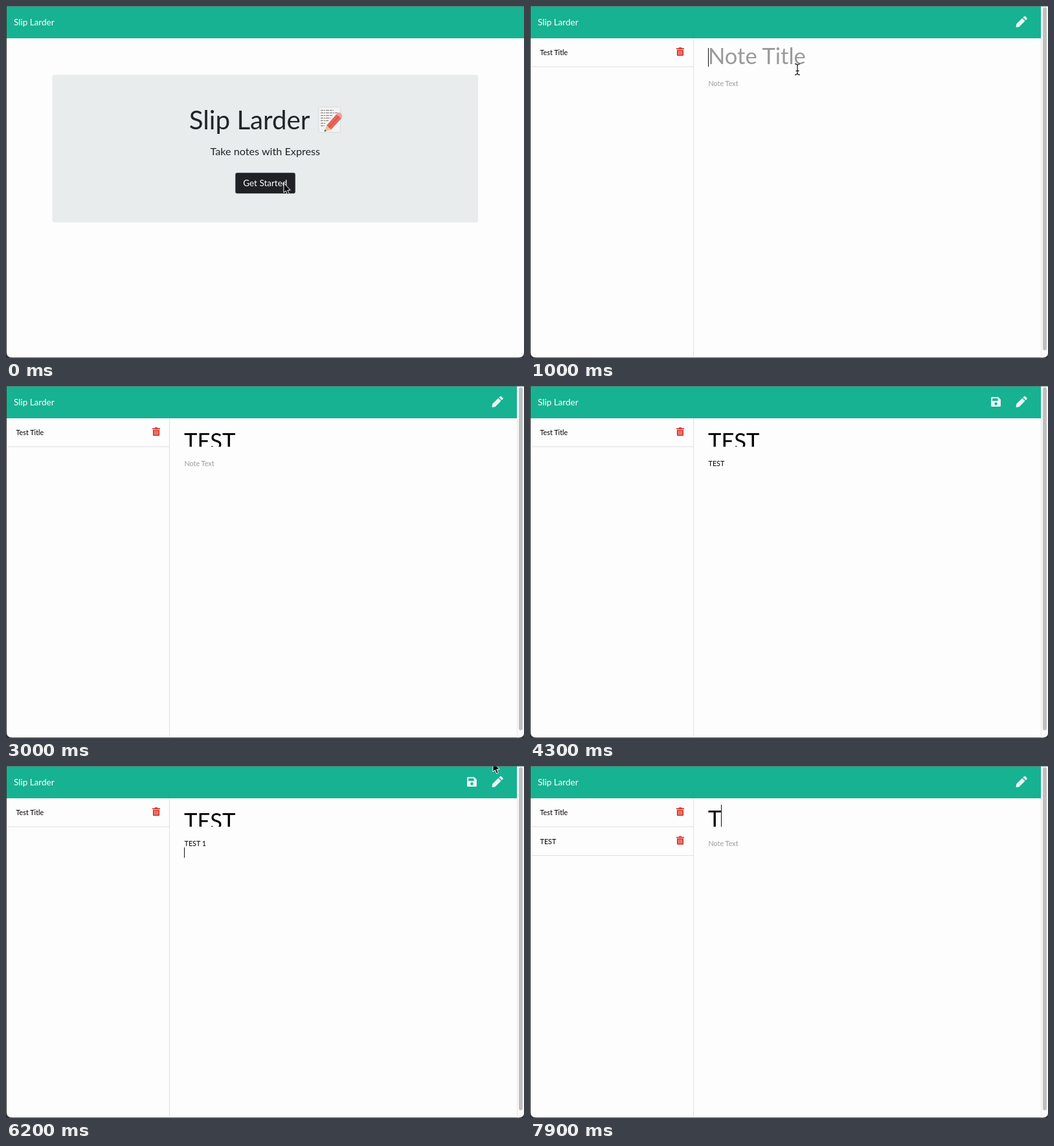
Animation, 800 px wide and 545 px high, one loop 8 s. Source, as an HTML page:

```html
<!DOCTYPE html>
<html lang="en">
<head>
<meta charset="utf-8">
<title>Slip Larder</title>
<style>
  html, body { margin: 0; width: 100%; height: 100%; overflow: hidden; background: #333; }
  svg { display: block; width: 800px; height: 545px; }
  text { font: 10.8px Lato, sans-serif; white-space: pre; }
  .brand { font-size: 13.5px; fill: #fff; }
  .big { font-size: 34.56px; }
  .rule { stroke: #dedfe0; }
</style>
</head>
<body>
<svg viewBox="0 0 800 545">
  <defs>
    <clipPath id="window"><path d="M1 .7H800V536Q800 544.3 792 544.3H9Q1 544.3 1 536Z"/></clipPath>
    <clipPath id="titleBox"><rect x="274" y="56" width="500" height="38"/></clipPath>
    <g id="trash">
      <path fill="#db3a2e" d="M0 1.3H3.6L4.4 0H7.6L8.4 1.3H12V3H0ZM.9 3.8H11.1V12Q11.1 13.3 9.8 13.3H2.2Q.9 13.3 .9 12Z"/>
      <path stroke="#f6d2ce" stroke-width=".9" d="M3.7 5.4V11.6M6 5.4V11.6M8.3 5.4V11.6"/>
    </g>
    <path id="beamShape" d="M-4 -8.5Q0 -8.5 0 -5.5V5.5Q0 8.5 -4 8.5M4 -8.5Q0 -8.5 0 -5.5M0 5.5Q0 8.5 4 8.5M-2.5 2.5H2.5"/>
  </defs>

  <g clip-path="url(#window)">
    <rect width="800" height="545" fill="#fefdfe"/>
    <rect width="800" height="50" fill="#17b292"/>
    <text class="brand" x="12" y="29.5">Slip Larder</text>

    <g id="landing">
      <rect x="71.5" y="106.5" width="657.5" height="228.5" rx="3.5" fill="#e8ecec"/>
      <text x="469.5" y="190.5" text-anchor="end" style="font-size:40.3px" fill="#212529">Slip Larder</text>
      <g id="memoIcon">
        <rect x="483" y="156.5" width="33.5" height="39" rx="1" fill="#f3f3f2" stroke="#d9dbdb"/>
        <path fill="none" stroke="#777" stroke-width="1" stroke-dasharray="4 1 2 1 5 1"
              d="M486 161.5H506M486 165.5H512M486 169.5H505M486 173.5H501M486 177.5H498M486 181.5H494M486 185.5H492"/>
        <path fill="#e9655a" d="M495 185L510.5 167.500L518 174L502 191.500Z"/>
        <path fill="#f2a29a" d="M510.500 167.500L513 165Q516 164 518.500 167.500Q520 170.500 518 174Z"/>
        <path fill="#e9c39a" d="M495 185L502 191.500L491.500 194.500Z"/>
        <path fill="#444" d="M492.600 191.200L494.700 193.600L491.500 194.500Z"/>
        <path stroke="#c9473f" d="M498.500 188.200L514.500 170.500"/>
      </g>
      <text x="400.300" y="231.300" text-anchor="middle" style="font-size:16.2px" fill="#212529">Take notes with Express</text>
      <rect x="354" y="258" width="93" height="32.500" rx="3" fill="#1f2124" stroke="#c9dcf0" stroke-width=".6"/>
      <text class="brand" x="400.300" y="278.800" text-anchor="middle">Get Started</text>
    </g>

    <g id="notes">
      <path class="rule" d="M252.500 50V545"/>
      <g id="firstNote">
        <text x="15.500" y="76">Test Title</text>
        <use href="#trash" x="226" y="64"/>
        <path class="rule" d="M2 94H252"/>
      </g>
      <g id="secondNote">
        <text x="15.500" y="120.500">TEST</text>
        <use href="#trash" x="226" y="108.500"/>
        <path class="rule" d="M2 138.500H252"/>
      </g>
      <g clip-path="url(#titleBox)"><text id="title" class="big" x="275"></text></g>
      <text id="body" x="275.500" y="124"></text>
      <rect id="caret" width="1" fill="#111"/>
      <g fill="#e9f7f4">
        <path transform="translate(750.500 15.700) scale(.0336)"
              d="M284 100L22 362 0 490Q0 512 22 512L150 490 412 228Q420 219 412 211L301 100Q292 92 284 100ZM452 188L324 60 370 14Q404 -14 438 14L498 74Q526 108 498 142Z"/>
        <path id="save" fill-rule="evenodd" transform="translate(712 17)"
              d="M1.600 0H11L15 4V13.400Q15 15 13.400 15H1.600Q0 15 0 13.400V1.600Q0 0 1.600 0ZM2.200 2.200V6H10.600V2.200ZM7.500 8.300A2.200 2.200 0 1 0 7.500 12.700A2.200 2.200 0 1 0 7.500 8.300Z"/>
      </g>
      <rect x="789.500" width="11" height="545" fill="#fafafa"/>
      <path stroke="#e9e9ea" d="M789.500 0V545"/>
      <rect x="792" y="2" width="6" height="531" rx="3" fill="#c0c0c1"/>
    </g>

    <path id="arrow" fill="#000" stroke="#fff" stroke-width="1" stroke-linejoin="round"
          d="M0 0V15L3.300 12L5.800 17.800L8.200 16.700L5.800 11.100H10.200Z"/>
    <g id="beam" fill="none">
      <use href="#beamShape" stroke="#fff" stroke-width="2.600"/>
      <use href="#beamShape" stroke="#222" stroke-width="1.300"/>
    </g>
  </g>
</svg>

<script>
const LOOP = 8000, STEP = 100, BLINK = 520, LEFT = 275;
const el = id => document.getElementById(id);
const show = (id, on) => el(id).style.display = on ? '' : 'none';

// Editor states: time, title, body, focused field
const edits = [
  [0, '', '', ''], [780, '', '', 'title'],
  [1600, 'T', '', 'title'], [1700, 'TE', '', 'title'],
  [1900, 'TES', '', 'title'], [2000, 'TEST', '', 'title'],
  [2280, 'TEST', '', 'body'],
  [3200, 'TEST', 'T', 'body'], [3300, 'TEST', 'TE', 'body'],
  [3500, 'TEST', 'TES', 'body'], [3600, 'TEST', 'TEST', 'body'],
  [3780, 'TEST', 'TEST ', 'body'], [4400, 'TEST', 'TEST 1', 'body'],
  [4680, 'TEST', 'TEST 1\n', 'body'],
  [6500, '', '', ''], [7000, '', '', 'title'], [7900, 'T', '', 'title']
];

// Pointer stops: time, x, y
const stops = [
  [0, 429, 274], [100, 429, 274], [800, 413, 98], [5500, 413, 98],
  [5900, 452, 76], [6199, 452, 76], [6200, 752, -6], [6400, 721, 24],
  [6600, 717, 28], [7000, 465, 86], [7200, 465, 86], [7300, 468, 85]
];

const lastBefore = (list, t) => list.findLastIndex(item => item[0] <= t);

function pointerAt(t) {
  const i = lastBefore(stops, t);
  const [t0, x0, y0] = stops[i];
  const [t1, x1, y1] = stops[i + 1] || [LOOP, x0, y0];
  const p = (t - t0) / (t1 - t0), ease = p * p * (3 - 2 * p);
  return [x0 + (x1 - x0) * ease, y0 + (y1 - y0) * ease];
}

function drawPlaceholder(field, value, hint) {
  field.textContent = value || hint;
  field.setAttribute('fill', value ? '#000' : '#999a9b');
}

function drawEditor(t) {
  const [since, title, body, focus] = edits[lastBefore(edits, t)];
  const titleField = el('title'), bodyField = el('body');
  drawPlaceholder(titleField, title, 'Note Title');
  titleField.setAttribute('y', !title ? 90 : focus === 'title' ? 93.5 : 98);
  drawPlaceholder(bodyField, body.trimEnd(), 'Note Text');
  if (body.endsWith(' ')) bodyField.textContent = body;
  show('save', title && body);

  const caretOn = focus && Math.floor((t - since) / BLINK) % 2 === 0;
  show('caret', caretOn);
  if (!caretOn) return;
  const value = focus === 'title' ? title : body;
  const newLine = value.endsWith('\n');
  const field = focus === 'title' ? titleField : bodyField;
  const x = LEFT + (value && !newLine ? field.getComputedTextLength() : 0);
  const [top, bottom] = focus === 'title' ? [title ? 60 : 65, 94] : newLine ? [126, 142] : [113, 127];
  el('caret').setAttribute('x', Math.round(x));
  el('caret').setAttribute('y', top);
  el('caret').setAttribute('height', bottom - top);
}

function drawPointer(t) {
  const [x, y] = pointerAt(t);
  const visible = t < 1600 || (t >= 5500 && t < 7900);
  const isBeam = t >= 200 && y > 58;
  show('arrow', visible && !isBeam);
  show('beam', visible && isBeam);
  el(isBeam ? 'beam' : 'arrow').setAttribute('transform', `translate(${x} ${y})`);
}

function draw(now) {
  const t = Math.floor(now % LOOP / STEP) * STEP;
  show('landing', t < 100);
  show('notes', t >= 100);
  show('firstNote', t >= 200);
  show('secondNote', t >= 6600);
  drawEditor(t);
  drawPointer(t);
}

const start = performance.now();
function tick() {
  draw(performance.now() - start);
  requestAnimationFrame(tick);
}
tick();
</script>
</body>
</html>
```
